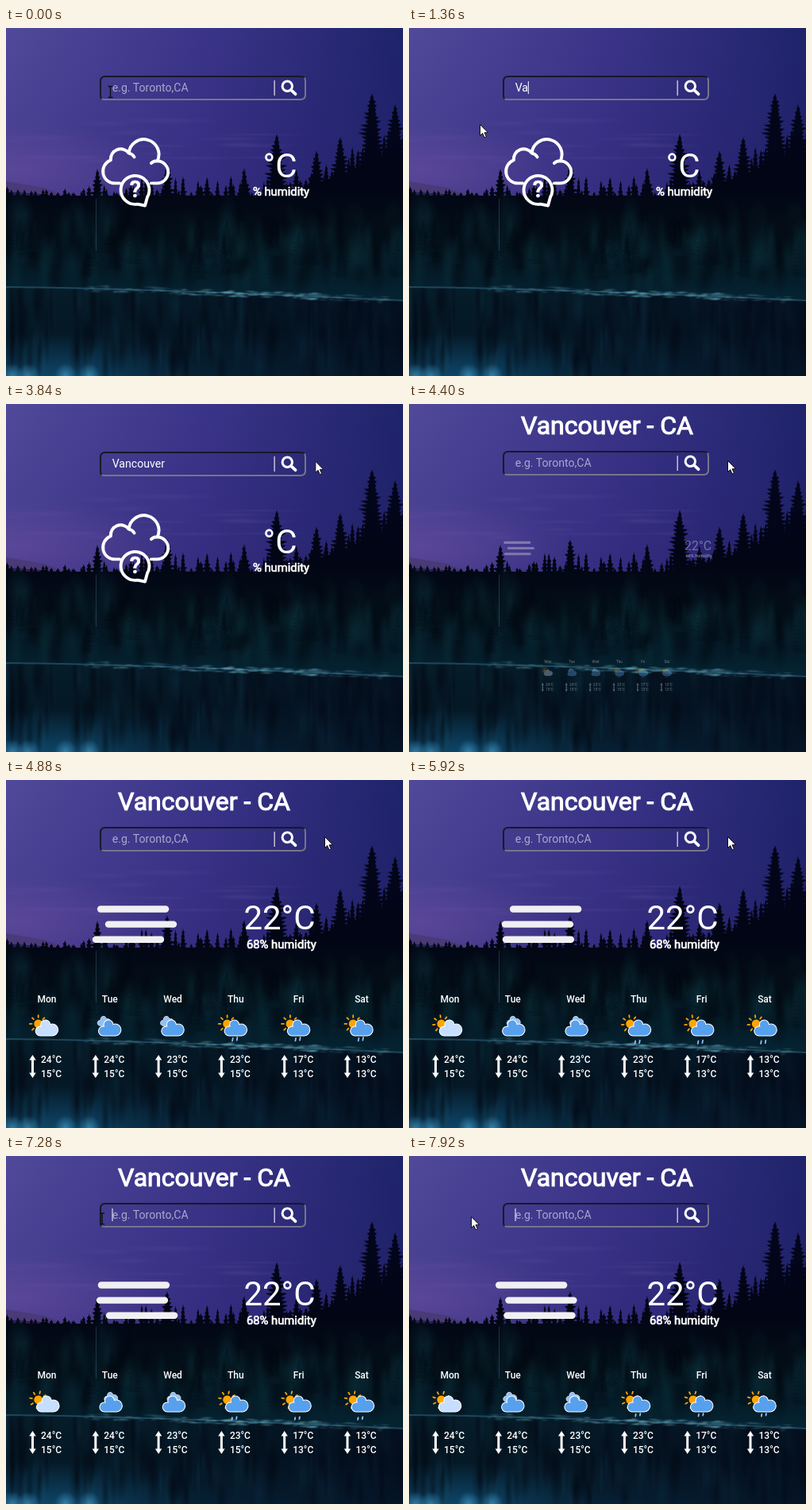
Animation, 500 px wide and 438 px high, one loop 8000 ms. Source, as an HTML page with a canvas:

```html
<!DOCTYPE html>
<html lang="en">
<head>
<meta charset="utf-8">
<title>Weather search</title>
<style>
html, body { margin: 0; width: 100%; height: 100%; overflow: hidden; background: #081030; }
canvas, svg { position: absolute; left: 0; top: 0; width: 500px; height: 438px; }
text { font-family: Roboto, Arial, sans-serif; fill: #fff; white-space: pre; }
.mid { text-anchor: middle; }
.bold { stroke: #fff; stroke-width: .7; }
.line { fill: none; stroke: #fff; stroke-width: 4; stroke-linecap: round; stroke-linejoin: round; }
.small { font-size: 12px; font-weight: 500; }
</style>
</head>
<body>
<canvas id="bg" width="500" height="438"></canvas>
<svg viewBox="0 0 500 438">
  <defs>
    <path id="cloud" stroke="#fff" stroke-width="1.2" d="M47.7,35.4c0-4.6-3.7-8.2-8.2-8.2c-1,0-1.9,.2-2.8,.5c-.3-3.4-3.1-6.2-6.6-6.2c-3.7,0-6.7,3-6.7,6.7c0,.8,.2,1.6,.4,2.3c-.3-.1-.7-.1-1-.1c-3.7,0-6.7,3-6.7,6.7c0,3.6,2.9,6.6,6.5,6.7h17.2C44.2,43.3,47.7,39.8,47.7,35.4z"/>
    <path id="range" fill="#fff" d="M0 346l4.2 6.5h-2.7v16h2.7l-4.2 6.5l-4.2-6.5h2.7v-16h-2.7z"/>
  </defs>

  <text id="title" class="mid" x="249.5" y="38" font-size="32" stroke="#fff" stroke-width="1.1">Vancouver - CA</text>

  <g id="search">
    <path d="M120.5 89.5Q119 88 119 85V67Q119 61 125 61H371Q374.5 61 376 62.5" fill="none" stroke="#191828" stroke-width="2"/>
    <path d="M376 62.5Q377 64 377 67V84Q377 90 371 90H125Q122 90 120.5 89" fill="none" stroke="#77758a" stroke-width="2"/>
    <text id="field" x="133.7" y="80.3" font-size="14.1"></text>
    <rect id="caret" y="67" width="1" height="16" fill="#fff"/>
    <rect x="337.5" y="66" width="1.3" height="19" fill="#d8d6e6"/>
    <circle cx="354.3" cy="73.2" r="6.2" fill="none" stroke="#fff" stroke-width="3"/>
    <path d="M359.2 78.2l5.3 5" stroke="#fff" stroke-width="3.8" stroke-linecap="round"/>
  </g>

  <g id="empty">
    <g class="line" transform="translate(162.5 224) scale(.97) translate(-163 -223.5)">
      <path d="M143 194H138A15.5 15.5 0 0 1 131.5 164A13 13 0 0 1 155 155A19.5 19.5 0 1 1 192 165A14.5 14.5 0 0 1 191 194H184M155 155q5 1 7 5M192 165q-5 0-8 3"/>
      <path d="M166 221A18.5 18.5 0 1 1 179 212L176 223Z"/>
    </g>
    <text class="mid bold" x="162.8" y="213" font-size="29" font-weight="500">?</text>
    <text class="mid" x="345" y="187.5" font-size="42">°C</text>
    <text class="mid bold" x="346.5" y="211" font-size="14.8">% humidity</text>
  </g>

  <g id="fog" stroke="#f0f0f2" stroke-width="8.4" stroke-linecap="round"></g>
  <g id="now">
    <text class="mid" x="344.5" y="188" font-size="42">22°C</text>
    <text class="mid bold" x="346.8" y="212" font-size="14.8">68% humidity</text>
  </g>
  <g id="week"></g>

  <path id="arrow" d="M-.5 -.5V13.5L2.7 10.5L5 15.8L7.3 14.8L5 9.7H9.5Z" fill="#fff" stroke="#111"/>
  <path id="beam" d="M-3-7h2l1 1l1-1h2M0-6V6M-3 7h2l1-1l1 1h2" fill="none" stroke="#0c0c14" stroke-width="1.3"/>
</svg>
<script>
const $ = id => document.getElementById(id);
const LOOP = 8000, STEP = 80, LOADED = 4345, ZOOM = 500;

// ---------- scenery ----------
let seed = 11;
const rnd = (a = 0, b = 1) => {
  seed = (seed * 16807) % 2147483647;
  return a + (b - a) * seed / 2147483647;
};
const c = $('bg').getContext('2d');

function fade(x0, y0, x1, y1, ...cols) {
  const g = c.createLinearGradient(x0, y0, x1, y1);
  cols.forEach((col, i) => g.addColorStop(i / (cols.length - 1), col));
  return g;
}
function fill(style, x, y, w, h) {
  c.fillStyle = style;
  c.fillRect(x, y, w, h);
}
function poly(style, pts) {
  c.fillStyle = style;
  c.beginPath();
  pts.forEach(p => c.lineTo(p[0], p[1]));
  c.fill();
}
function glow(x, y, rx, ry, rgb, a) {
  c.save();
  c.translate(x, y);
  c.scale(rx, ry);
  const g = c.createRadialGradient(0, 0, 0, 0, 0, 1);
  g.addColorStop(0, `rgba(${rgb},${a})`);
  g.addColorStop(1, `rgba(${rgb},0)`);
  fill(g, -1, -1, 2, 2);
  c.restore();
}
function tree(x, top, height, half, style) {
  const left = [], right = [];
  const n = Math.max(6, Math.round(height / 5));
  for (let i = 1; i <= n; i++) {
    const y = top + height * i / n, w = half * Math.pow(i / n, .75);
    left.unshift([x - w * rnd(.6, 1.2), y], [x - w * .4, y - 1]);
    right.push([x + w * .4, y - 1], [x + w * rnd(.6, 1.2), y]);
  }
  poly(style, [[x, top], ...right, ...left]);
}

const climb = x => Math.max(0, x - 330) / 170;
const ridge = x => 211 - 55 * climb(x) ** 1.2;
const shore = x => 326 + 17 * (x / 500) ** 1.4;
const span = (f, n = 25) => [...Array(n + 1)].map((_, i) => [500 * i / n, f(500 * i / n)]);

function sky() {
  fill(fade(0, 60, 500, 100, '#50499a', '#3a3488', '#1e2369'), 0, 0, 500, 345);
  fill(fade(0, 0, 0, 220, 'rgba(40,30,120,0)', 'rgba(40,25,105,.28)'), 0, 0, 500, 220);
  glow(20, 180, 190, 60, '120,85,165', .4);
  for (let i = 0; i < 16; i++)
    glow(rnd(0, 330), rnd(115, 175), rnd(25, 75), rnd(2, 5), '115,90,165', .16);
  poly('#4a3a78', [[0, 193], [48, 201], [125, 230], [0, 230]]);
  poly('#241f50', [[0, 206], [70, 211], [70, 230], [0, 230]]);
}

function forest() {
  const dark = fade(0, 130, 0, 335, '#03051a', '#020514', '#031019', '#052230');
  poly(dark, [...span(ridge), [500, 345], [0, 345]]);
  for (let x = 2; x < 500; x += 7) {
    const up = rnd(4, x < 110 ? 13 : 26) + 10 * climb(x);
    tree(x + rnd(-3, 3), ridge(x) - up, up + 14, rnd(6, 10), dark);
  }
  // the trees that stand out: x, top, height
  const tall = [[115, 177, 45], [203, 170, 48], [300, 176, 42], [341, 133, 80],
    [391, 154, 60], [421, 137, 75], [461, 82, 95], [490, 96, 85]];
  for (const [x, top, h] of tall) tree(x, top, h, h * .26, dark);

  for (let i = 0; i < 110; i++) {
    const x = rnd(0, 500), lit = i % 2;
    glow(x, rnd(235, 315), rnd(7, 16), rnd(18, 42), lit ? '12,52,62' : '1,5,14', lit ? .34 : .45);
  }
  for (let i = 0; i < 40; i++)
    tree(rnd(0, 500), rnd(235, 275), rnd(35, 55), rnd(8, 14), i % 2 ? 'rgba(12,48,58,.13)' : 'rgba(1,5,14,.22)');
  fill('rgba(90,120,150,.35)', 113, 215, 1, 65);
}

function lake() {
  c.save();
  c.beginPath();
  [...span(shore), [500, 438], [0, 438]].forEach(p => c.lineTo(...p));
  c.clip();
  fill(fade(0, 325, 0, 438, '#061d2a', '#051825', '#07263a'), 0, 320, 500, 118);
  glow(60, 445, 170, 60, '20,95,140', .6);
  for (let i = 0; i < 130; i++) {
    const lit = i % 3 === 0;
    glow(rnd(0, 500), rnd(335, 430), rnd(3, 11), rnd(20, 50), lit ? '20,75,100' : '2,8,18', lit ? .25 : .5);
  }
  for (const x of [8, 28, 75, 105]) glow(x, 438, 14, 16, '75,170,220', .6);
  fill(fade(120, 0, 500, 0, 'rgba(3,8,24,0)', 'rgba(3,8,24,.6)'), 120, 320, 380, 118);
  c.restore();

  c.lineWidth = 2;
  c.strokeStyle = 'rgba(60,120,150,.45)';
  c.beginPath();
  span(shore).forEach(p => c.lineTo(...p));
  c.stroke();
  for (let i = 0; i < 130; i++) {
    const x = rnd(100, 480);
    glow(x, shore(x) + rnd(-4, 4), rnd(4, 12), 2, '85,150,170', x > 220 && x < 390 ? .45 : .22);
  }
}
sky();
forest();
lake();

// ---------- forecast ----------
const DAYS = [['Mon', 24, 15, 'sun'], ['Tue', 24, 15, 'cloud'], ['Wed', 23, 15, 'cloud'],
  ['Thu', 23, 15, 'rain'], ['Fri', 17, 13, 'rain'], ['Sat', 13, 13, 'rain']];

const rays = [...Array(8)].map((_, i) =>
  `<path d="M0 9V12" transform="rotate(${i * 45})" stroke="orange" stroke-width="2" stroke-linecap="round"/>`).join('');
const sun = `<g transform="translate(0 16)"><g class="sun"><circle r="6" fill="orange"/>${rays}</g></g>`;
const back = '<g class="back"><use href="#cloud" fill="#91c0f8" transform="translate(-10 -7.5) scale(.6)"/></g>';
const drop = (x, y) => `<path class="drop" d="M${x} ${y}v8" stroke="#91c0f8" stroke-width="2" stroke-linecap="round" stroke-dasharray="4 7"/>`;
const rain = `<g transform="translate(14 36) rotate(10)">${drop(-6, 1)}${drop(0, -1)}</g>`;

$('week').innerHTML = DAYS.map(([day, hi, lo, kind], i) => {
  const x = 51.5 + 79.3 * i;
  return `<text class="mid small" x="${x}" y="279.5">${day}</text>
    <g transform="translate(${x - 10.8} 292.5) scale(.9)">
      ${kind === 'rain' ? rain : ''}${kind === 'cloud' ? back : sun}
      <g class="front"><use href="#cloud" fill="${kind === 'sun' ? '#c6deff' : '#57a0ee'}" transform="translate(-20 -11)"/></g>
    </g>
    <use href="#range" x="${x - 18}"/>
    <text class="small" x="${x - 7.5}" y="355.5">${hi}°C</text>
    <text class="small" x="${x - 7.5}" y="373.5">${lo}°C</text>`;
}).join('');

// amplitude, period, phase in degrees
const FOG = [[9.5, 4100, -18], [7, 3600, 85], [9, 4200, -90]];
$('fog').innerHTML = FOG.map((_, i) => `<path d="M4 ${162.5 + 19.1 * i}h82"/>`).join('');

const all = s => [...document.querySelectorAll(s)];
const suns = all('.sun'), backs = all('.back'), fronts = all('.front'), drops = all('.drop');
const fogs = [...$('fog').children];

// ---------- motion ----------
const CITY = 'Vancouver', TYPE_AT = 1200, KEY = 140;
const HOME = [131.5, 80.5];
// start, duration, x, y
const MOVES = [[500, 400, 90, 122], [2960, 480, 357, 75], [3680, 240, 402, 72],
  [5980, 500, 144, 80], [7120, 400, 79, 77]];

const smooth = p => p * p * (3 - 2 * p);
const clamp = p => Math.min(1, Math.max(0, p));
const mod = (a, n) => ((a % n) + n) % n;
const tri = p => 1 - Math.abs(1 - 2 * mod(p, 1));
const show = (el, on) => el.setAttribute('visibility', on ? 'visible' : 'hidden');
const move = (el, v) => el.setAttribute('transform', v);

// CSS "ease" curve
function ease(x) {
  if (x <= 0 || x >= 1) return clamp(x);
  let lo = 0, hi = 1, u = .5;
  const bez = (a, b) => 3 * (1 - u) ** 2 * u * a + 3 * (1 - u) * u * u * b + u ** 3;
  for (let i = 0; i < 20; i++) {
    if (bez(.25, .25) < x) lo = u; else hi = u;
    u = (lo + hi) / 2;
  }
  return bez(.1, 1);
}

function zoom(el, p, x, y) {
  const s = .3 + .7 * ease(p);
  move(el, `translate(${x} ${y}) scale(${s}) translate(${-x} ${-y})`);
  el.setAttribute('opacity', ease(p * 2));
}

function pointer(t) {
  let [x, y] = HOME;
  for (const [at, dur, tx, ty] of MOVES) {
    const p = smooth(clamp((t - at) / dur));
    x += (tx - x) * p;
    y += (ty - y) * p;
  }
  const inField = x > 119 && x < 337 && y > 60 && y < 91;
  for (const id of ['arrow', 'beam']) {
    show($(id), (id === 'beam') === inField);
    move($(id), `translate(${x} ${y})`);
  }
}

function field(t, loaded) {
  const n = loaded ? 0 : Math.max(0, Math.min(CITY.length, Math.floor((t - TYPE_AT) / KEY) + 1));
  const el = $('field');
  el.textContent = n ? CITY.slice(0, n) : 'e.g. Toronto,CA';
  el.setAttribute('fill-opacity', n ? 1 : .56);
  const lastKey = n ? TYPE_AT + (n - 1) * KEY : 400;
  const since = t < 3600 ? t - lastKey : t - 6900;
  show($('caret'), since >= 0 && since % 1000 < 500);
  $('caret').setAttribute('x', 133.5 + (n ? el.getComputedTextLength() : 0));
}

function draw(t) {
  const loaded = t >= LOADED, p = (t - LOADED) / ZOOM, d = t - 4880;
  show($('empty'), !loaded);
  for (const id of ['title', 'fog', 'now', 'week']) show($(id), loaded);
  move($('search'), `translate(0 ${loaded ? -1 : 0})`);
  field(t, loaded);
  pointer(t);

  zoom($('fog'), p, 125, 181.5);
  zoom($('now'), p, 376, 182);
  zoom($('week'), p, 250, 354);

  FOG.forEach(([amp, period, phase], i) =>
    move(fogs[i], `translate(${118 + amp * Math.sin(2 * Math.PI * d / period + phase * Math.PI / 180)} 0)`));
  suns.forEach(el => move(el, `rotate(${d * .08})`));
  backs.forEach(el => move(el, `translate(${-5 + 15 * tri(d / 3500)} 0)`));
  fronts.forEach(el => move(el, `translate(${2 * tri(d / 1500)} 0)`));
  drops.forEach(el => el.setAttribute('stroke-dashoffset', -mod(d * .025, 11)));
}

// fog lines are drawn from x = 0 and placed by their sine
const start = performance.now();
function tick() {
  const t = (performance.now() - start) % LOOP;
  draw(Math.floor(t / STEP) * STEP);
  requestAnimationFrame(tick);
}
tick();
</script>
</body>
</html>
```
